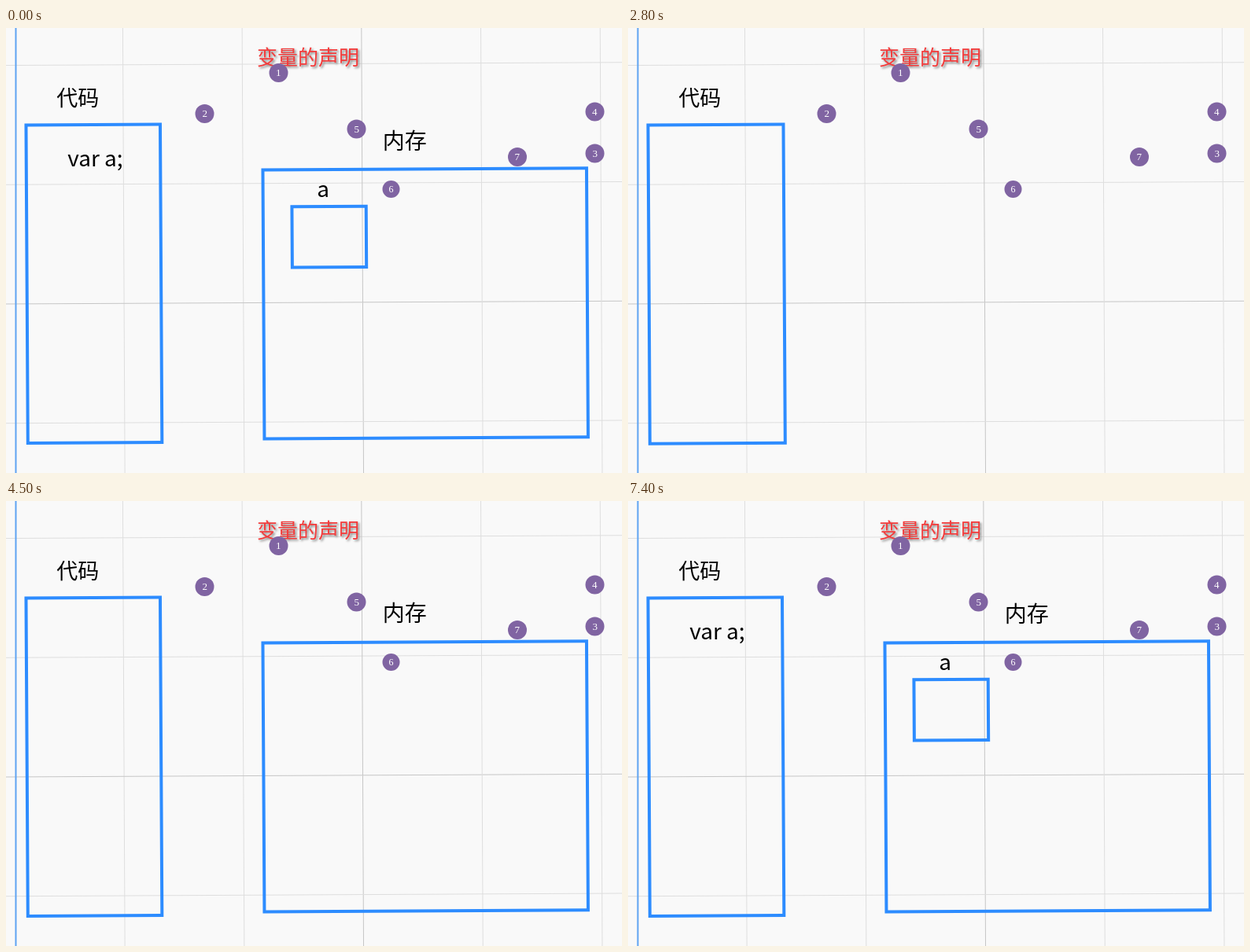
Animation of 783x566 px, one loop 8700 ms. Source, as an HTML page with a canvas:

```html
<!DOCTYPE html>
<html lang="zh-CN">
<head>
<meta charset="utf-8">
<title>变量的声明</title>
<style>
  html, body { margin: 0; width: 100%; height: 100%; overflow: hidden; background: #f9f9f9; }
  canvas { display: block; }
</style>
</head>
<body>
<canvas id="stage" width="783" height="566"></canvas>
<script>
const ctx = document.getElementById('stage').getContext('2d');
const LOOP = 8700, STEP = 100, RESET = 1000;
const BLUE = '#2d8cff';
const SANS = '"Noto Sans CJK SC", "Noto Sans CJK", "Noto Sans", sans-serif';
const TILT = -0.0058, GRID_TILT = -0.0048;
const PERSPECTIVE = 475, ZOOM = 1.19;
const rad = deg => deg * Math.PI / 180;

function bezier(x1, y1, x2, y2) {
  const at = (a, b, s) => 3 * a * s * (1 - s) ** 2 + 3 * b * s * s * (1 - s) + s ** 3;
  return x => {
    let lo = 0, hi = 1;
    for (let i = 0; i < 24; i++) {
      const mid = (lo + hi) / 2;
      if (at(x1, x2, mid) < x) lo = mid; else hi = mid;
    }
    return at(y1, y2, lo);
  };
}
const ease = bezier(.25, .1, .25, 1);
const easeIn = bezier(.42, 0, 1, 1);
const bounce = bezier(.215, .61, .355, 1);

// keys: [offset, value, easing towards the next key]
function track(p, keys) {
  if (p >= 1) return keys[keys.length - 1][1];
  const i = keys.findIndex(k => k[0] > p) - 1;
  const [from, a, curve] = keys[i], [to, b] = keys[i + 1];
  return a + (b - a) * curve((p - from) / (to - from));
}
const FLIP = [[0, 90, easeIn], [.4, -20, easeIn], [.6, 10, ease], [.8, -5, ease], [1, 0]];
const POP = [[0, .3, bounce], [.2, 1.1, bounce], [.4, .9, bounce], [.6, 1.03, bounce], [.8, .97, bounce], [1, 1]];
const SLIDE = [[0, -3000, bounce], [.6, 25, bounce], [.75, -10, bounce], [.9, 5, bounce], [1, 0]];
const FADE = [[0, 0, bounce], [.6, 1, bounce], [1, 1]];

// Progress of an entrance: 1 before the reset, -1 while hidden
function progress(time, start, first, duration = 1000) {
  if (time < RESET) return 1;
  return time < start ? -1 : Math.min(1, first + (time - start) / duration);
}

function box(cx, cy, w, h, { flip = 0, spin = 0, alpha = 1 } = {}) {
  const turn = rad(spin) + TILT, cos = Math.cos(turn), sin = Math.sin(turn);
  const project = (x, y) => {
    const k = PERSPECTIVE / (PERSPECTIVE + x * Math.sin(rad(flip)));
    x *= Math.cos(rad(flip)) * k;
    y *= k;
    return [cx + x * cos - y * sin, cy + x * sin + y * cos];
  };
  ctx.globalAlpha = alpha;
  ctx.fillStyle = BLUE;
  ctx.beginPath();
  for (const edge of [2, -2]) {
    const x = w / 2 + edge, y = h / 2 + edge;
    for (const [sx, sy] of [[-1, -1], [1, -1], [1, 1], [-1, 1]]) ctx.lineTo(...project(sx * x, sy * y));
    ctx.closePath();
    ctx.moveTo(...project(-w / 2 + 2, -h / 2 + 2));
  }
  ctx.fill('evenodd');
  ctx.globalAlpha = 1;
}

function flipBox(time, start, first, cx, cy, w, h) {
  const p = progress(time, start, first);
  if (p < 0) return;
  const grow = time >= start && time < start + 900 ? 1.5 : 0;
  box(cx + grow / 2, cy + grow / 4, w + grow, h + grow / 2,
    { flip: track(p, FLIP), alpha: Math.min(1, p / .6) });
}

// Places the inked area of the text around (cx, cy)
function label(text, cx, cy, size, { color = '#000', scale = 1, alpha = 1, family = SANS } = {}) {
  ctx.save();
  ctx.font = `${size}px ${family}`;
  ctx.fillStyle = color;
  ctx.globalAlpha = alpha;
  ctx.translate(cx, cy);
  ctx.scale(scale, scale);
  const m = ctx.measureText(text);
  ctx.fillText(text, (m.actualBoundingBoxLeft - m.actualBoundingBoxRight) / 2,
    (m.actualBoundingBoxAscent - m.actualBoundingBoxDescent) / 2);
  ctx.restore();
}

function popLabel(time, start, text, cx, cy, size) {
  const p = progress(time, start, .25);
  if (p >= 0) label(text, cx, cy, size, { scale: track(p, POP), alpha: track(p, FADE) });
}

function slideLabel(p, text, cx, cy, dx, dy) {
  if (p < 0) return;
  const shift = track(p, SLIDE) * ZOOM;
  label(text, cx + dx * shift, cy + dy * shift, 28, { alpha: track(p, FADE) });
}

function backdrop() {
  ctx.fillStyle = '#f9f9f9';
  ctx.fillRect(0, 0, 783, 566);
  ctx.save();
  ctx.translate(453.5, 348.8);
  ctx.rotate(GRID_TILT);
  ctx.lineWidth = 1;
  for (let i = -3; i <= 3; i++) {
    const d = i * 151.7;
    ctx.strokeStyle = i === 0 ? '#c6c6c6' : '#dedede';
    ctx.beginPath();
    ctx.moveTo(-500, d);
    ctx.lineTo(400, d);
    ctx.moveTo(d, -400);
    ctx.lineTo(d, 300);
    ctx.stroke();
  }
  ctx.restore();
  ctx.fillStyle = '#5fa3f2';
  ctx.fillRect(11.5, 0, 2, 566);
}

function title() {
  ctx.save();
  ctx.shadowColor = '#888';
  ctx.shadowOffsetX = ctx.shadowOffsetY = 2;
  ctx.shadowBlur = 3;
  label('变量的声明', 384, 36.5, 26, { color: '#f33b3b' });
  ctx.restore();
}

const BADGES = [[346.5, 57], [252.5, 109], [748.5, 159.5], [748.5, 106.5], [445.5, 128.5], [489.5, 205, 11], [650, 164]];
function badges() {
  BADGES.forEach(([x, y, r = 12], i) => {
    ctx.fillStyle = '#8064a2';
    ctx.beginPath();
    ctx.arc(x, y, r, 0, 2 * Math.PI);
    ctx.fill();
    label(String(i + 1), x, y, r + 1, { color: '#fff', family: '"Liberation Serif", serif' });
  });
}

function draw(time) {
  backdrop();
  title();
  popLabel(time, 1000, '代码', 90.7, 88, 27);
  flipBox(time, 2000, .277, 111.9, 325.2, 170.5, 404.5);
  flipBox(time, 2900, .245, 533.2, 350.4, 411.5, 342);
  popLabel(time, 3800, '内存', 507.3, 142.5, 28);
  slideLabel(progress(time, 5100, .435), 'var a;', 113, 171.5, 0, 1);
  const spin = progress(time, 5700, .13);
  if (spin >= 0) box(410.8, 265.6, 94.3, 77.3, { spin: -200 * (1 - ease(spin)), alpha: ease(spin) });
  slideLabel(progress(time, 6800, .31, 870), 'a', 402.8, 207, 1, 0);
  badges();
}

const begin = performance.now();
function tick() {
  const time = (performance.now() - begin) % LOOP;
  draw(Math.floor(time / STEP) * STEP);
  requestAnimationFrame(tick);
}
tick();
</script>
</body>
</html>
```
